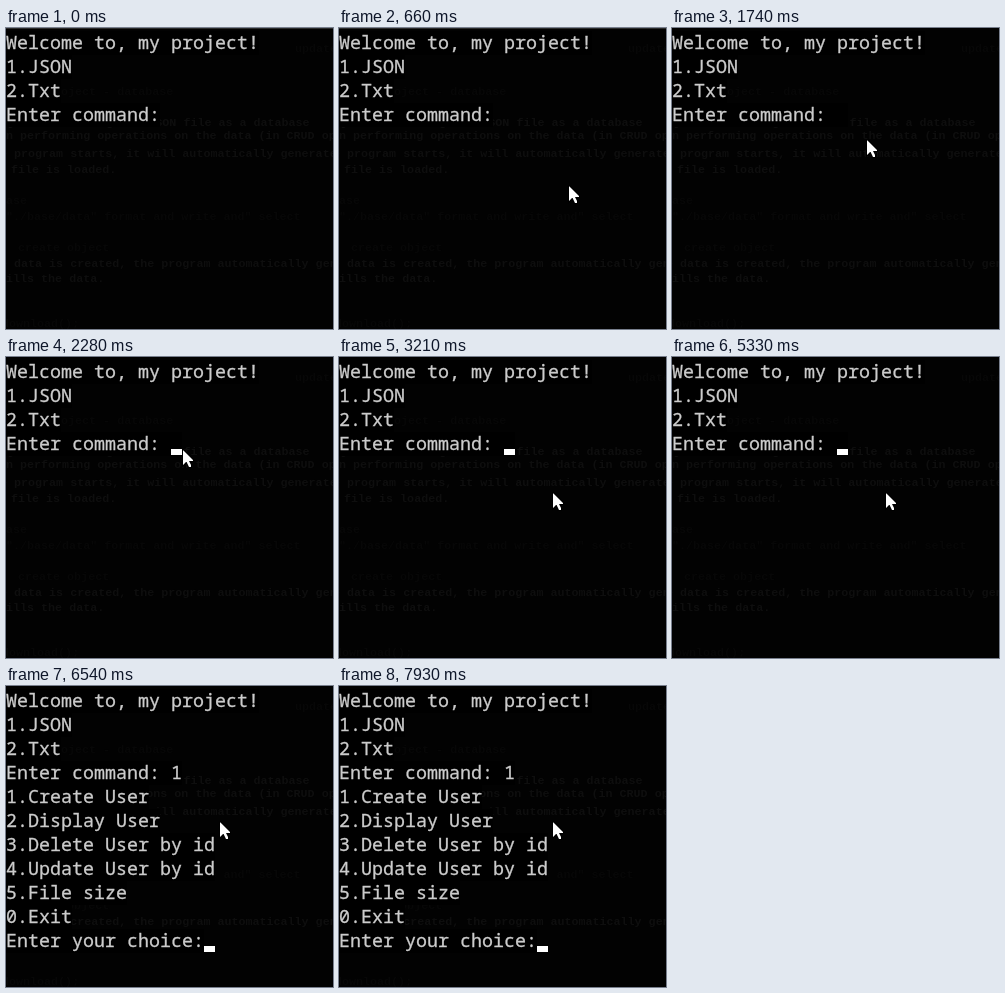
An HTML page that plays this animation: 327 px wide and 301 px high, repeating every 8000 ms.

```html
<!DOCTYPE html>
<html lang="en">
<head>
<meta charset="utf-8">
<title>Console menu</title>
<style>
  html, body { margin: 0; width: 100%; height: 100%; overflow: hidden; background: #020202; }
  svg { display: block; }
  text { white-space: pre; }
  #ghost { font: bold 11.7px "Liberation Mono", monospace; fill: #0e0e0e; }
  #ghost .dim { fill: #070707; }
  #screen { font: 18.333px "Noto Sans Mono", "DejaVu Sans Mono", monospace; fill: #ccc; }
  #screen text { stroke: #ccc; stroke-width: .3px; }
</style>
</head>
<body>
<svg id="stage" width="327" height="301" viewBox="0 0 327 301">
  <rect width="327" height="301" fill="#020202"/>
  <rect id="edge" width="327" height="1" fill="#2b2b2b"/>
  <g id="ghost"></g>
  <g id="screen"></g>
  <rect id="caret" width="11" height="6" fill="#fff" shape-rendering="crispEdges"/>
  <circle id="click" cx="194" cy="111" r="12" fill="#ff0" fill-opacity=".47"/>
  <path id="pointer" d="M1 1.5H1.5L11 11V12H7L9 16V18H7L4.6 13H4L1 16Z"
        fill="#fff" stroke="#000" stroke-width="2" paint-order="stroke"/>
</svg>
<script>
const LOOP = 8000, CELL_W = 11, CELL_H = 24, TOP = 3;
const $ = id => document.getElementById(id);

function add(parent, name, attrs, content = '') {
  const node = document.createElementNS('http://www.w3.org/2000/svg', name);
  for (const key in attrs) node.setAttribute(key, attrs[key]);
  node.textContent = content;
  parent.append(node);
  return node;
}

// Faint page showing through the translucent console: [x, baseline, text, class]
[
  [289, 24, 'update', 'dim'],
  [41, 67, 'project - database', 'dim'],
  [-19, 98, 'project uses a regular JSON file as a database'],
  [-7, 111, 'en performing operations on the data (in CRUD op'],
  [-6, 129, 'e program starts, it will automatically generate'],
  [5, 145, 'file is loaded.'],
  [0, 176, 'ase', 'dim'],
  [0, 192, '"./base/data" format and write and" select', 'dim'],
  [12, 223, 'create object', 'dim'],
  [-6, 239, 'e data is created, the program automatically gene'],
  [-7, 254, 'tills the data.'],
  [-4, 299, 'download();', 'dim']
].forEach(([x, y, content, tone = '']) => add($('ghost'), 'text', { x, y, class: tone }, content));

// Printed cells are opaque, so each run hides the page behind it.
function print(parent, col, row, content) {
  const x = col * CELL_W, y = TOP + row * CELL_H;
  add(parent, 'rect', { x, y, width: content.length * CELL_W, height: CELL_H, fill: '#000' });
  add(parent, 'text', { x, y: y + 18 }, content);
}

const [intro, input, answer, menu] = [0, 1, 2, 3].map(() => add($('screen'), 'g', {}));
['Welcome to, my project!', '1.JSON', '2.Txt', 'Enter command:']
  .forEach((line, row) => print(intro, 0, row, line));
print(input, 14, 3, '  ');
print(answer, 15, 3, '1');
['1.Create User', '2.Display User', '3.Delete User by id', '4.Update User by id',
  '5.File size', '0.Exit', 'Enter your choice:']
  .forEach((line, i) => print(menu, 0, i + 4, line));

const caretOn = [[2130, 2670], [3210, 3740], [4270, 4800], [5330, 5880],
  [5950, 6410], [6480, 7470], [7930, LOOP]];
const caretCells = [[6540, 18, 10], [6480, 0, 4], [5950, 16, 3], [0, 15, 3]];

const easeOut = u => 1 - (1 - u) ** 2;
const easeInOut = u => u * u * (3 - 2 * u);
const moves = [
  { start: 390, end: 1130, steps: 12, first: 0, from: [280, 225], to: [194, 111], ease: easeOut },
  { start: 2070, end: 2410, steps: 6, first: 1, from: [194, 111], to: [174, 90], ease: easeOut },
  { start: 2670, end: 2940, steps: 5, first: 1, from: [174, 90], to: [213, 135], ease: easeInOut }
];

// The pointer was sampled at a fixed rate, so it advances in discrete steps.
function pointerAt(t) {
  const move = moves.filter(m => t >= m.start).pop();
  if (!move) return null;
  const { start, end, steps, first, from, to, ease } = move;
  const last = steps - 1;
  const step = Math.min(last, Math.floor((t - start) / (end - start) * last + 0.03));
  const u = ease((step + first) / (last + first));
  return from.map((a, i) => Math.round(a + (to[i] - a) * u));
}

const show = (node, on) => node.setAttribute('visibility', on ? 'visible' : 'hidden');
const within = (t, [a, b]) => t >= a && t < b;

function render(t) {
  const focused = t >= 1590;
  show($('edge'), !focused);
  show(input, focused);
  show(answer, t >= 5950);
  show(menu, t >= 6540);
  show($('click'), within(t, [1590, 1740]));

  const [, col, row] = caretCells.find(([from]) => t >= from);
  $('caret').setAttribute('x', col * CELL_W);
  $('caret').setAttribute('y', TOP + row * CELL_H + 17);
  show($('caret'), caretOn.some(span => within(t, span)));

  const at = pointerAt(t);
  show($('pointer'), at);
  if (at) $('pointer').setAttribute('transform', `translate(${at})`);
}

const began = performance.now();
function tick() {
  render((performance.now() - began) % LOOP);
  requestAnimationFrame(tick);
}
tick();
</script>
</body>
</html>
```
